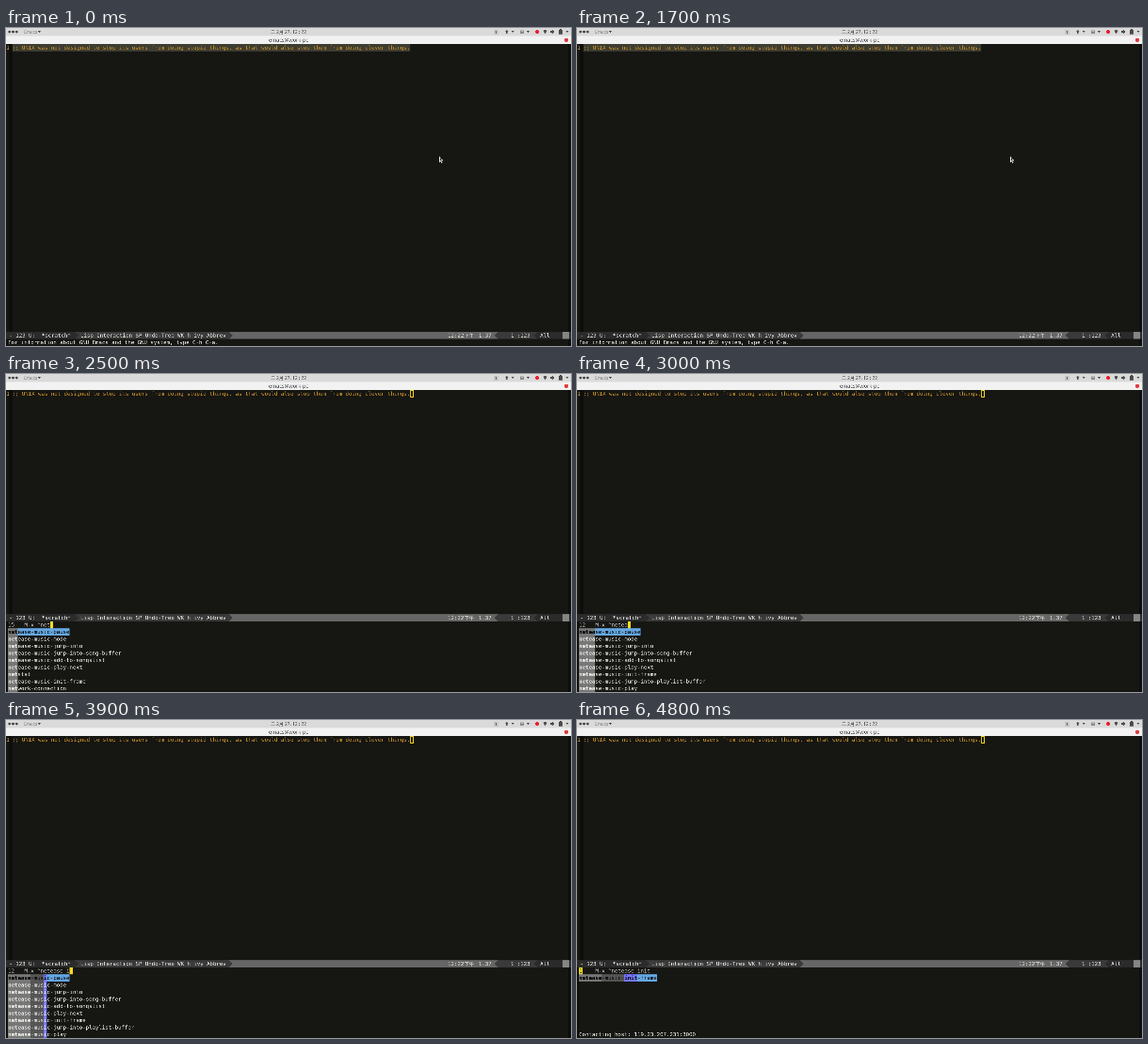
Write an HTML page with a canvas that moves like this. It is 600x338 px and loops after 5.8 s.

```html
<!DOCTYPE html>
<html lang="en">
<head>
<meta charset="utf-8">
<title>Emacs command completion</title>
<style>
  html, body { margin: 0; width: 100%; height: 100%; overflow: hidden; background: #161613; }
  canvas { display: block; width: 600px; height: 338px; }
</style>
</head>
<body>
<canvas id="stage" width="1920" height="1080"></canvas>
<script>
// The desktop is drawn at full size; CSS scales it down to the stage.
const ctx = document.getElementById('stage').getContext('2d');
const LOOP = 5800;
const CELL = 11, ROW = 24;
const MONO = '18.27px "DejaVu Sans Mono", monospace';
const SANS = '"Noto Sans", "Noto Sans CJK SC", "Noto Sans CJK JP", sans-serif';
const MINI_X = 7, TEXT_X = 21, EDITOR_Y = 55;
const YELLOW = '#f4dc1e', WHITE = '#e8e8e4', BODY = '#161613', FRINGE = '#0d0d0b';

const quote = ';; UNIX was not designed to stop its users from doing stupid things, ' +
  'as that would also stop them from doing clever things.';

const allCommands = ['org-move-item-down', 'emms-score-set-tolerance', 'magit-diff-popup',
  'tabbar-mwheel-switch-tab', 'gnus-score-mode', 'desktop-save-in-desktop-dir',
  'yas/about', 'company-version', 'edebug-Trace-fast-mode'];

const netCommands = ['netease-music-pause', 'netease-music-mode', 'netease-music-jump-into',
  'netease-music-jump-into-song-buffer', 'netease-music-add-to-songslist',
  'netease-music-play-next', 'netstat', 'netease-music-init-frame', 'network-connection',
  'netease-music-jump-into-playlist-buffer', 'netease-music-play'];

// [start in ms, typed input, number of matches]
const typing = [
  [2100, '', 5912], [2200, 'n', 214], [2400, 'ne', 48], [2500, 'net', 15],
  [2700, 'nete', 12], [3000, 'netea', 12], [3200, 'neteas', 12], [3300, 'netease', 12],
  [3500, 'netease ', 12], [3800, 'netease i', 12], [4000, 'netease in', 4],
  [4100, 'netease ini', 1], [4200, 'netease init', 1]
];

function rect(x, y, w, h, color) {
  ctx.fillStyle = color;
  ctx.fillRect(x, y, w, h);
}

function poly(color, ...points) {
  ctx.beginPath();
  for (let i = 0; i < points.length; i += 2) ctx.lineTo(points[i], points[i + 1]);
  ctx.closePath();
  ctx.fillStyle = color;
  ctx.fill();
}

function dot(x, y, r, color) {
  ctx.beginPath();
  ctx.arc(x, y, r, 0, 7);
  ctx.fillStyle = color;
  ctx.fill();
}

function label(str, x, y, color, font, align = 'left') {
  ctx.font = font;
  ctx.textAlign = align;
  ctx.fillStyle = color;
  ctx.fillText(str, x, y);
}

// Grid text with its top edge at y; returns the x after the last cell.
function mono(str, x, y, color = WHITE, back, bold) {
  const width = str.length * CELL;
  if (back) rect(x, y, width, ROW, back);
  label(str, x, y + 18, color, (bold ? 'bold ' : '') + MONO);
  return x + width;
}

function drawPanel() {
  const ink = '#4a4a4a';
  rect(0, 0, 1920, 28, '#dadada');
  rect(0, 27, 1920, EDITOR_Y - 27, '#f2f2f2');
  [12, 24, 36].forEach(x => dot(x, 13, 4.5, ink));
  label('Emacs', 61, 18, '#8a8a8a', '15px ' + SANS);
  label('二 2月 27, 12 : 22', 960, 19, ink, '15.5px ' + SANS, 'center');
  label('emacs@work-pc', 960, 47, '#444', '17.5px ' + SANS, 'center');
  [113, 1722, 1774, 1907].forEach(x => poly(ink, x - 5, 10, x + 5, 10, x, 16));

  rect(1658, 5, 15, 17, '#c8c8c8');
  label('1', 1665, 18, ink, '13px ' + SANS, 'center');
  poly(ink, 1696, 13, 1702, 6, 1708, 13, 1704, 13, 1704, 20, 1700, 20, 1700, 13);
  rect(1747, 8, 13, 11, '#8a8a8a');
  rect(1750, 11, 7, 2, '#dadada');
  dot(1805, 13, 6.5, '#e8202c');
  poly(ink, 1825, 9, 1832, 6, 1839, 9, 1832, 20);
  poly(ink, 1849, 10, 1853, 10, 1858, 6, 1858, 20, 1853, 16, 1849, 16);
  rect(1860, 9, 2, 8, ink);
  rect(1879, 7, 11, 14, ink);
  rect(1882, 4, 5, 3, ink);
  dot(1904, 41, 7, '#e23b3f');
}

function drawModeline(y) {
  const dark = '#2b2b2b', mid = '#3a3a3a', light = '#666';
  const middle = y + ROW / 2, end = y + ROW;
  rect(0, y, 1920, ROW, light);
  poly(mid, 230, y, 758, y, 770, middle, 758, end, 230, end);
  poly(dark, 0, y, 234, y, 246, middle, 234, end, 0, end);
  poly(mid, 1920, y, 1672, y, 1660, middle, 1672, end, 1920, end);
  poly(dark, 1920, y, 1806, y, 1794, middle, 1806, end, 1920, end);
  rect(1891, y, 23, ROW, '#858585');
  mono('- 123 U:  *scratch*', 11, y);
  mono('Lisp Interaction SP Undo-Tree WK h ivy Abbrev', 253, y);
  mono('12:22', 1501, y);
  label('下午', 1558, y + 18, WHITE, '16px ' + SANS);
  mono('1.37', 1606, y);
  mono('1 :123', 1715, y);
  mono('All', 1815, y);
}

function drawEditor(t, active) {
  const cursorX = TEXT_X + quote.length * CELL;
  rect(0, EDITOR_Y, 1920, 1080 - EDITOR_Y, BODY);
  rect(CELL, EDITOR_Y, TEXT_X - CELL, 1080 - EDITOR_Y, FRINGE);
  rect(1910, EDITOR_Y, 10, 1080 - EDITOR_Y, FRINGE);
  mono('1', 1, EDITOR_Y, '#d8b24c');
  mono(quote, TEXT_X, EDITOR_Y, '#c8922c', active && '#3e3d31');
  if (!active) {
    ctx.strokeStyle = YELLOW;
    ctx.lineWidth = 2;
    ctx.strokeRect(cursorX + 1, EDITOR_Y + 1, CELL - 2, ROW - 2);
  } else if (t >= 200 && Math.floor((t - 200) / 500) % 2 === 0) {
    rect(cursorX, EDITOR_Y, CELL, ROW, YELLOW);
  }
}

function drawMinibuffer(y) {
  rect(0, y, 1910, 1080 - y, BODY);
  rect(0, y, MINI_X - 1, 1080 - y, FRINGE);
}

function drawCandidate(name, pattern, y, selected) {
  const color = selected ? '#000' : WHITE;
  const [, first = '', gap = '', second = ''] = name.match(pattern);
  let x = mono(first, MINI_X, y, color, '#777', true);
  x = mono(gap, x, y, color, '#555');
  x = mono(second, x, y, color, '#77f', true);
  mono(name.slice((first + gap + second).length), x, y, color, selected && '#65a7e2');
}

function drawCompletion(t, top) {
  const [, input, count] = typing.filter(step => step[0] <= t).pop();
  const [head, tail = ''] = input.split(' ');
  const pattern = new RegExp(tail ? `^(${head})(.*?)(${tail})` : `^(${head})`);
  const prompt = String(count).padEnd(4) + ' M-x ^' + input;
  const end = mono(prompt, MINI_X, top, '#c9ccca');
  if (t < 4600) rect(end, top, CELL, ROW, YELLOW);
  else mono('1', MINI_X, top, '#000', YELLOW);

  (input ? netCommands : allCommands)
    .filter(name => pattern.test(name))
    .slice(0, 9)
    .forEach((name, i) => drawCandidate(name, pattern, top + ROW * (i + 1), i === 0));
  if (t >= 4800) mono('Contacting host: 119.23.207.231:3000', MINI_X, 1056);
}

function drawPointer() {
  ctx.save();
  ctx.translate(1473, 436);
  poly('#e8e8e8', 0, 0, 0, 20, 4, 17, 7, 23, 11, 21, 8, 15, 13, 14);
  poly('#222', 2.5, 5, 2.5, 15, 5, 13, 8, 19, 8.5, 18, 6, 12, 9, 12);
  ctx.restore();
}

function draw(now) {
  const t = now % LOOP;
  const active = t < 2100;
  const miniY = active ? 1056 : 840;
  drawEditor(t, active);
  drawPanel();
  drawModeline(miniY - ROW);
  drawMinibuffer(miniY);
  if (active) {
    mono('For information about GNU Emacs and the GNU system, type C-h C-a.', MINI_X, miniY);
  } else {
    drawCompletion(t, miniY);
  }
  if (t < 2200) drawPointer();   // hidden while typing
}

const start = performance.now();
function tick() {
  draw(performance.now() - start);
  requestAnimationFrame(tick);
}
tick();
</script>
</body>
</html>
```
